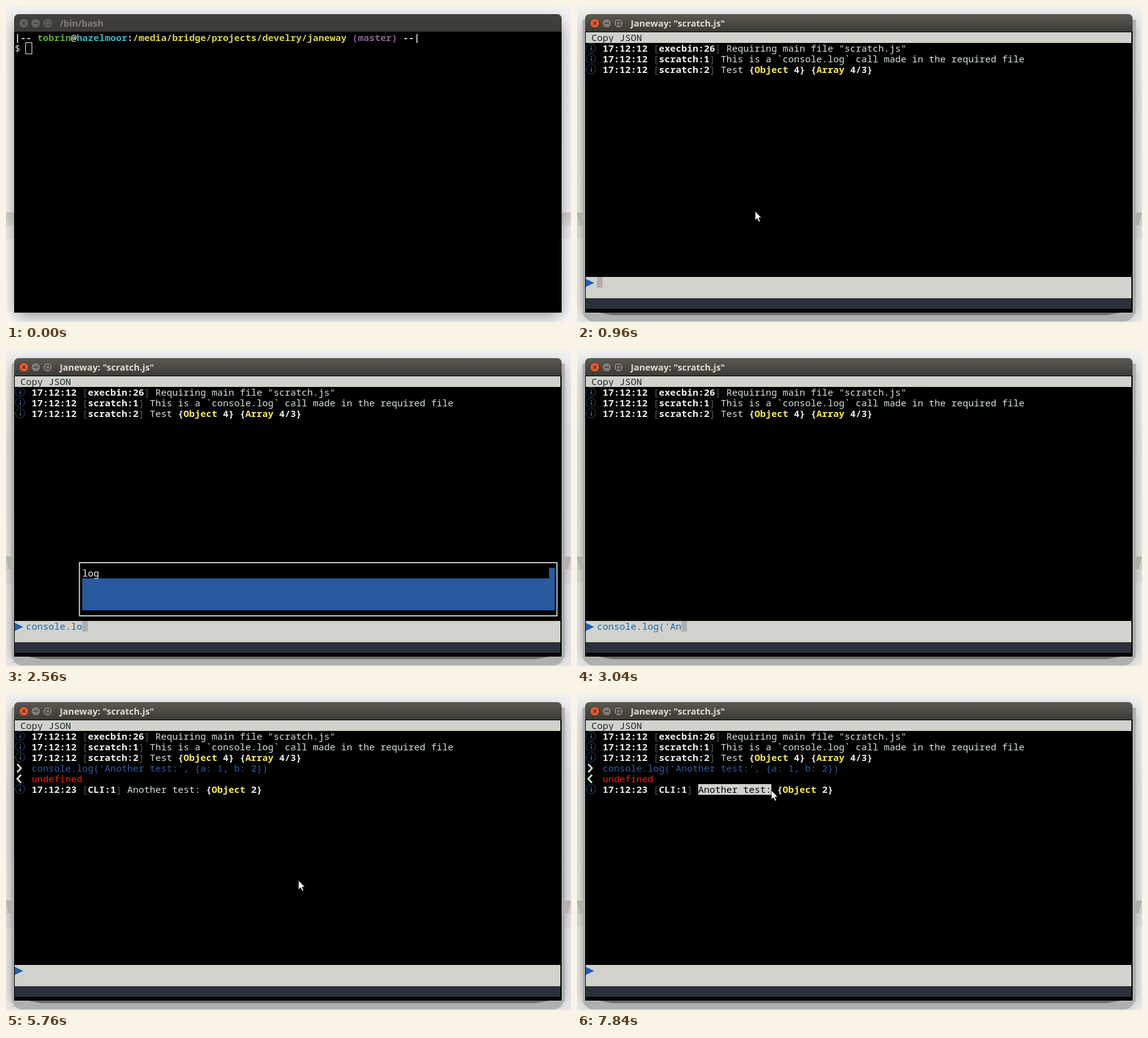
Recreate the animation shown at these times as an HTML page with a canvas. Size 904 px wide and 505 px high, loop 8 s.

```html
<!DOCTYPE html>
<html lang="en">
<head>
<meta charset="utf-8">
<title>Terminal session</title>
<style>
  html, body { margin: 0; width: 100%; height: 100%; overflow: hidden; background: #f4f4f4; }
  canvas { display: block; }
</style>
</head>
<body>
<canvas id="stage" width="904" height="505"></canvas>
<script>
const ctx = document.getElementById('stage').getContext('2d');
const STEP = 160, LOOP = 8000;
const CELL_W = 9, CELL_H = 17;
const MONO = '15px "Noto Sans Mono", "DejaVu Sans Mono", monospace';
const TITLE = 'bold 14.5px "Noto Sans", "Open Sans", sans-serif';
const PAPER = '#d2d2cd', TEXT = '#d5e2da', BRIGHT = '#eef2ee', DIM = '#555753';
const YELLOW = '#fce94f', BLUE = '#2a599d';
const COMMAND = "console.log('Another test:', {a: 1, b: 2})";
const LAUNCH = 'janeway scratch.js';

// Keys are [step, value, ...]
const TYPING = [[10, 0], [12, 2], [14, 5], [16, 10], [21, 19], [26, 29], [28, 33], [32, 42]];
const POINTER_EARLY = [[5, 282, 342], [6, 285, 328], [7, 288, 309], [10, 288, 309]];
const POINTER_LATE = [[34, 506, 335], [35, 504, 331], [36, 468, 298], [38, 390, 226],
  [40, 330, 178], [41, 304, 166], [43, 304, 166], [45, 311, 154]];
const ENTER = 33, SELECT = 46;

const colX = col => 14 + col * CELL_W;
const rowY = row => 42 + row * CELL_H;

function track(keys, step) {
  if (step <= keys[0][0]) return keys[0].slice(1);
  for (let i = 1; i < keys.length; i++) {
    const a = keys[i - 1], b = keys[i];
    if (step <= b[0]) {
      const p = (step - a[0]) / (b[0] - a[0]);
      return a.slice(1).map((v, n) => v + (b[n + 1] - v) * p);
    }
  }
  return keys[keys.length - 1].slice(1);
}

function rect(x, y, w, h, color) {
  ctx.fillStyle = color;
  ctx.fillRect(x, y, w, h);
}

function poly(color, ...points) {
  ctx.beginPath();
  points.forEach(([x, y]) => ctx.lineTo(x, y));
  ctx.closePath();
  ctx.fillStyle = color;
  ctx.fill();
}

function line(color, width, ...points) {
  ctx.beginPath();
  points.forEach(([x, y], i) => i ? ctx.lineTo(x, y) : ctx.moveTo(x, y));
  ctx.strokeStyle = color;
  ctx.lineWidth = width;
  ctx.stroke();
}

function ramp(x0, y0, x1, y1, ...stops) {
  const g = ctx.createLinearGradient(x0, y0, x1, y1);
  stops.forEach(([at, color]) => g.addColorStop(at, color));
  return g;
}

// Writes consecutive [text, color, bold] runs on the character grid.
function write(col, row, ...runs) {
  for (const [text, color, bold] of runs) {
    ctx.font = (bold ? 'bold ' : '') + MONO;
    ctx.fillStyle = color;
    ctx.fillText(text, colX(col), rowY(row) + 14);
    col += text.length;
  }
}

function desktop(active) {
  rect(0, 0, 904, 505, active
    ? ramp(0, 0, 0, 505, [0, '#f1f1f1'], [0.3, '#e4e4e4'], [1, '#e9e9e9'])
    : ramp(0, 0, 0, 505, [0, '#f2f2f2'], [0.65, '#f4f4f4'], [0.74, '#fafafa'], [1, '#fcfcfc']));
  rect(0, 330, 904, 21, active ? '#d4d3d1' : ramp(0, 330, 0, 351, [0, '#d2d0ce'], [1, '#e4e2e1']));
  rect(0, 351, 904, 21, active ? '#dfdfdf' : '#efefef');

  ctx.save();
  ctx.shadowColor = active ? 'rgba(0,0,0,.5)' : 'rgba(0,0,0,.42)';
  ctx.shadowBlur = active ? 20 : 24;
  ctx.shadowOffsetY = active ? 4 : 7;
  rect(14, 20, 874, 469, '#000');
  ctx.restore();

  if (!active) return;
  rect(9, 22, 4, 470, '#aeaeac');
  rect(889, 22, 5, 470, '#aeaeac');
  poly('#b2b1ae', [0, 330], [9, 330], [9, 351], [5, 351]);
  poly('#b2b1ae', [904, 330], [894, 330], [894, 351], [898, 351]);
  ctx.beginPath();
  ctx.roundRect(10, 470, 882, 34, 16);
  ctx.fillStyle = '#b0b0ae';
  ctx.fill();
  poly('#6d6d6d', [35, 490], [870, 490], [848, 494], [56, 494]);
}

function windowFrame(active, title) {
  ctx.beginPath();
  ctx.roundRect(13, 13, 876, 29, [7, 7, 0, 0]);
  ctx.fillStyle = active
    ? ramp(0, 13, 0, 41, [0, '#5b5952'], [1, '#3c3b36'])
    : ramp(0, 13, 0, 41, [0, '#42413c'], [1, '#3b3a36']);
  ctx.fill();
  rect(13, 41, 876, 449, '#000');

  const ink = active ? '#3a3934' : '#3d3c38';
  [28.5, 47.5, 66.5].forEach((x, i) => {
    ctx.beginPath();
    ctx.arc(x, 27.5, 7.5, 0, 7);
    ctx.fillStyle = !active ? '#64635e' : i ? '#7d7b73' : '#e95a2e';
    ctx.fill();
    ctx.strokeStyle = '#33322e';
    ctx.lineWidth = 1;
    ctx.stroke();
  });
  line(ink, 1.4, [26, 25], [31, 30]);
  line(ink, 1.4, [31, 25], [26, 30]);
  line(ink, 1.4, [44, 27.5], [51, 27.5]);
  ctx.strokeRect(63.5, 24.5, 6, 6);

  ctx.font = TITLE;
  ctx.fillStyle = active ? '#dfdbd2' : '#807d78';
  ctx.fillText(title, 86, 33);
}

function shell(step) {
  write(0, 0, ['|-- ', TEXT, true], ['tobrin', '#5cab30', true], ['@', TEXT, true],
    ['hazelmoor', '#34b3c9', true], [':', TEXT, true],
    ['/media/bridge/projects/develry/janeway', '#d9cf45', true],
    [' (master)', '#87628f', true], [' --|', TEXT, true]);
  const typed = LAUNCH.slice(0, track([[1, 0], [4, LAUNCH.length]], step)[0]);
  write(0, 1, ['$ ' + typed, TEXT]);
  const x = colX(2 + typed.length);
  if (step) {
    rect(x, 59, CELL_W, CELL_H, TEXT);
  } else {
    ctx.strokeStyle = '#e4e4dc';
    ctx.lineWidth = 1;
    ctx.strokeRect(x - 0.5, 58.5, 10, 18);
  }
}

function infoIcon(row) {
  const y = rowY(row) + 8;
  ctx.beginPath();
  ctx.arc(22.5, y, 7.3, 0, 7);
  ctx.strokeStyle = '#33466f';
  ctx.lineWidth = 1;
  ctx.stroke();
  rect(22, y - 4, 1.5, 1.5, '#4a74c0');
  rect(22, y - 1, 1.5, 5, '#4a74c0');
}

function log(row, time, place, ...message) {
  infoIcon(row);
  write(3, row, [time, BRIGHT, true], [' [', DIM], [place, BRIGHT, true], ['] ', DIM], ...message);
}

const badge = (kind, size) => [['{', BRIGHT, true], [kind, YELLOW, true], [` ${size}}`, BRIGHT, true]];

function chevron(row, dir) {
  const y = rowY(row) + 8.5;
  line(TEXT, 2.6, [21 - 3 * dir, y - 6.5], [21 + 3 * dir, y], [21 - 3 * dir, y + 6.5]);
}

function popup(col, items) {
  const x = colX(col), w = 878 - x;
  rect(x, rowY(18), w, 4 * CELL_H, BLUE);
  rect(x, rowY(18), w - CELL_W, CELL_H, '#000');
  ctx.strokeStyle = '#e8efec';
  ctx.lineWidth = 1.6;
  ctx.strokeRect(x - 4.5, 339.8, w + 8, 85);
  items.forEach((item, i) => write(col, 18 + i, [item, i ? '#c4e6e2' : '#f4f7f4']));
}

function app(step) {
  rect(14, 42, 873, CELL_H, PAPER);
  write(1, 0, ['Copy JSON', '#1b2b2b']);
  log(1, '17:12:12', 'execbin:26', ['Requiring main file "scratch.js"', TEXT]);
  log(2, '17:12:12', 'scratch:1', ['This is a `console.log` call made in the required file', TEXT]);
  log(3, '17:12:12', 'scratch:2', ['Test ', TEXT], ...badge('Object', '4'), [' ', TEXT], ...badge('Array', '4/3'));

  const entered = step >= ENTER;
  if (entered) {
    const selected = step >= SELECT;
    chevron(4, 1);
    write(3, 4, [COMMAND, '#315c9e']);
    chevron(5, -1);
    write(3, 5, ['undefined', '#e6230f']);
    if (selected) rect(colX(20), rowY(6), 13 * CELL_W, CELL_H, PAPER);
    log(6, '17:12:23', 'CLI:1', ['Another test:', selected ? '#000' : TEXT], [' ', TEXT], ...badge('Object', '2'));
  }

  rect(14, rowY(23), 873, 2 * CELL_H, PAPER);
  rect(14, rowY(25), 873, CELL_H, '#2c303c');
  poly('#2360a6', [14, 436], [27.5, 442.5], [14, 449]);

  const typed = entered ? '' : COMMAND.slice(0, track(TYPING, step)[0]);
  if (typed || step % 4 >= 2) rect(colX(2 + typed.length), rowY(23), CELL_W, CELL_H, '#b0aeab');
  write(2, 23, [typed, '#1b66a5']);

  if (step === 12 || step === 13) popup(4, ['console', 'constructor', 'constructor']);
  if (step === 16) popup(12, ['log']);
}

function pointer(step) {
  const keys = step >= 34 ? POINTER_LATE : step >= 5 && step <= 10 ? POINTER_EARLY : null;
  if (!keys) return;
  ctx.save();
  ctx.translate(...track(keys, step));
  poly('#fff', [0, 0], [0, 14.5], [3.4, 11.5], [5.8, 17], [8.2, 16], [5.8, 10.7], [10, 10.3]);
  ctx.strokeStyle = '#111';
  ctx.lineWidth = 0.8;
  ctx.stroke();
  ctx.restore();
}

function draw() {
  const step = Math.floor(performance.now() % LOOP / STEP);
  const running = step >= 5;
  desktop(step > 0);
  windowFrame(step > 0, running ? 'Janeway: "scratch.js"' : '/bin/bash');
  running ? app(step) : shell(step);
  pointer(step);
  requestAnimationFrame(draw);
}
draw();
</script>
</body>
</html>
```
